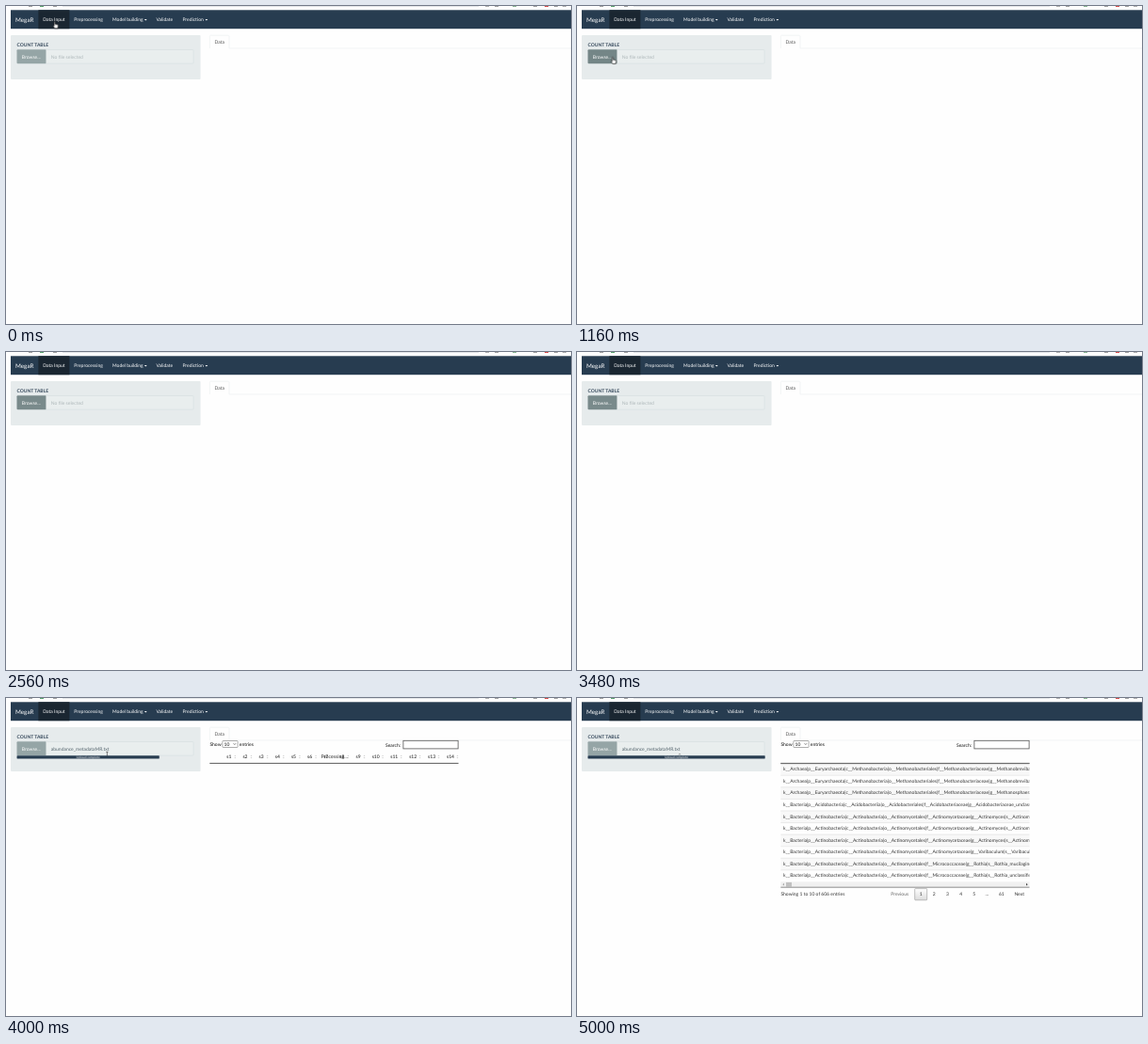
Write an HTML page that moves like this. It is 600 px wide and 338 px high and loops after 5.24 s.

```html
<!DOCTYPE html>
<html lang="en">
<head>
<meta charset="utf-8">
<title>Count table upload</title>
<style>
  html, body { margin: 0; width: 100%; height: 100%; overflow: hidden; background: #fefefe; }
  svg { display: block; width: 600px; height: 338px; }
  text { font: 5px Lato, sans-serif; fill: #333; text-rendering: geometricPrecision; white-space: pre; }
  .nav text { fill: #fff; }
  .brand { font-size: 6.33px; }
  .bold { font-weight: 700; }
  .mid { text-anchor: middle; }
  .light { fill: #fff; }
  .tiny { font-size: 3.33px; }
  .strong { fill: #222; font-weight: 500; }
  .mute { fill: #666; }
  .hidden { opacity: 0; }
  #bar { transform-origin: 11.5px 0; }
</style>
</head>
<body>
<svg viewBox="0 0 600 338">
  <defs>
    <linearGradient id="page" x2="0" y2="1">
      <stop stop-color="#fff"/><stop offset="1" stop-color="#dcdcdc"/>
    </linearGradient>
    <clipPath id="tableClip"><rect x="216.3" y="69" width="264.2" height="127"/></clipPath>
  </defs>

  <rect width="600" height="338" fill="#fefefe"/>
  <g id="toolbar">
    <rect x="60" width="442" height="1" fill="#e4e6e8"/>
  </g>

  <g class="nav">
    <rect x="5" y="4.3" width="595" height="19.9" fill="#273c50"/>
    <rect x="34.4" y="4.3" width="33" height="19.9" fill="#1a2631"/>
    <text class="brand" x="10" y="16.6">MegaR</text>
    <text x="39.3" y="16.1">Data Input</text>
    <text x="72.3" y="16.1">Preprocessing</text>
    <text x="113" y="16.1">Model building</text>
    <text x="159.6" y="16.1">Validate</text>
    <text x="187.4" y="16.1">Prediction</text>
    <path d="M146.9 13.9h2.8l-1.4 1.5zM211.5 13.9h2.8l-1.4 1.5z" fill="#fff"/>
  </g>

  <rect x="5" y="30.9" width="201.6" height="47" rx="1" fill="#e6ebec"/>
  <text class="bold" x="11.5" y="42.9" style="fill:#34475a">COUNT TABLE</text>
  <rect x="42.3" y="46.5" width="156.8" height="14.6" rx="1" fill="#e9eeee" stroke="#d6dedf" stroke-width=".6"/>
  <path id="button" d="M12.5 46.2h29.9v15H12.5q-1 0-1-1v-13q0-1 1-1z" fill="#95a5a6"/>
  <text class="light" x="16.8" y="55.5">Browse...</text>
  <text id="empty" x="47.8" y="55.5" style="fill:#adb7b9">No file selected</text>
  <text id="file" class="hidden" x="47.8" y="55.5" style="fill:#53636c">abundance_metadataMR.txt</text>

  <path d="M237 45h363M216.4 45V32.2q0-1 1-1H236q1 0 1 1V45" fill="none" stroke="#eef1f2" stroke-width=".7"/>
  <text x="221.6" y="40" style="fill:#555">Data</text>

  <g id="controls" class="hidden">
    <text class="strong" x="216.4" y="51">Show</text>
    <rect x="229.9" y="45.5" width="16.2" height="7" rx=".7" fill="#fff" stroke="#777" stroke-width=".6"/>
    <text class="strong" x="231.6" y="51">10</text>
    <path d="M241.6 48.3l1.2 1.2 1.2-1.2" fill="none" stroke="#222" stroke-width=".6"/>
    <text class="strong" x="247.8" y="51">entries</text>
    <text class="strong" x="403" y="51.5">Search:</text>
    <rect x="421.9" y="45.3" width="58.2" height="8.6" fill="#fff" stroke="#555" stroke-width=".8"/>
    <path d="M216.3 69.4h264.2" stroke="#333" stroke-width=".8"/>
  </g>
  <g id="heads" class="hidden"></g>
  <g id="table" class="hidden">
    <g id="rows" clip-path="url(#tableClip)"></g>
    <rect x="216.3" y="195.4" width="264.2" height="5.5" fill="#f1f1f1"/>
    <rect x="222" y="195.9" width="6" height="4.6" fill="#c1c1c1"/>
    <path d="M220 196.8v2.8l-1.7-1.4z" fill="#aaa"/>
    <path d="M477 196.8v2.8l1.7-1.4z" fill="#444"/>
    <path d="M216.3 201.2h264.2" stroke="#444" stroke-width=".6"/>
    <text x="216.4" y="210">Showing 1 to 10 of 606 entries</text>
    <rect x="358.7" y="202.6" width="13" height="12.2" rx=".7" fill="url(#page)" stroke="#979797" stroke-width=".6"/>
    <g id="pager"></g>
  </g>

  <g id="caret" class="hidden">
    <path d="M106.3 57.3h2.2M107.4 57.3v5M106.3 62.3h2.2" stroke="#333" stroke-width=".6"/>
  </g>
  <path id="caretTip" class="hidden" d="M108.2 60.3l.8-1 .8 1" fill="none" stroke="#444" stroke-width=".6"/>
  <g id="progress" class="hidden">
    <rect id="bar" x="11.5" y="61.3" width="188.2" height="3.2" rx=".4" fill="#273c50"/>
    <text id="done" class="light tiny mid" x="11.5" y="64.1">Upload complete</text>
  </g>

  <path id="arrow" class="hidden" d="M0 0v6.6l1.5-1.4 1 2.3 1-.4-1-2.3h2z" fill="#fff" stroke="#111" stroke-width=".5"/>
  <path id="hand" d="M1 .6Q1.6 0 2 .7V3l2.4.6q.9.3.8 1.2L4.7 7.6H1.6L-.2 5.1q0-.9 1.2-.2z" fill="#fff" stroke="#111" stroke-width=".6"/>
</svg>
<script>
const LOOP = 5240;
const $ = id => document.getElementById(id);

function add(parent, tag, attrs, content = '') {
  const el = document.createElementNS('http://www.w3.org/2000/svg', tag);
  for (const key in attrs) el.setAttribute(key, attrs[key]);
  el.textContent = content;
  return $(parent).appendChild(el);
}

// Slivers of the browser toolbar above the page
[[26, '#999'], [38, '#4a9a60'], [52, '#999'], [511, '#aaa'], [521, '#999'], [540, '#7fb08a'],
 [562, '#999'], [574, '#d33b3b'], [584, '#999'], [593, '#aaa']].forEach(([x, fill]) =>
  add('toolbar', 'rect', { x: x - 2, width: 4, height: .9, fill }));

// Column heads
for (let i = 1; i <= 14; i++) {
  const x = i < 11 ? 234.3 + (i - 1) * 17.15 : 408.3 + (i - 11) * 19.9;
  const icon = x + (i < 10 ? 8 : 10.4);
  add('heads', 'text', { x, y: 64.2, class: 'strong' }, 's' + i);
  add('heads', 'path', { d: `M${icon} 62l1-1.3 1 1.3zM${icon} 63l1 1.3 1-1.3z`, fill: '#ccc' });
}
add('heads', 'text', { x: 348.8, y: 64, class: 'mid', style: 'font-size:5.3px' }, 'Processing...');

// Taxonomy rows
const archaea = 'k__Archaea|p__Euryarchaeota|c__Methanobacteria|o__Methanobacteriales|f__Methanobacteriaceae|g__';
const acido = 'k__Bacteria|p__Acidobacteria|c__Acidobacteriia|o__Acidobacteriales|f__Acidobacteriaceae|g__';
const actino = 'k__Bacteria|p__Actinobacteria|c__Actinobacteria|o__Actinomycetales|f__';
const actinomyces = actino + 'Actinomycetaceae|g__Actinomyces|s__Actinomyces';
const rothia = actino + 'Micrococcaceae|g__Rothia|s__Rothia_';
[
  archaea + 'Methanobrevibacter', archaea + 'Methanobrevibacter', archaea + 'Methanosphaera|s__',
  acido + 'Acidobacteriaceae_unclassified',
  actinomyces, actinomyces, actinomyces,
  actino + 'Actinomycetaceae|g__Varibaculum|s__Varibaculum',
  rothia + 'mucilaginosa', rothia + 'unclassified'
].forEach((name, i) => {
  const y = 69.7 + i * 12.57;
  add('rows', 'rect', { x: 216, y, width: 265, height: 12.57, fill: i % 2 ? '#fefefe' : '#f8f8f8' });
  add('rows', 'path', { d: `M216 ${y}h265`, stroke: i ? '#ddd' : '#444', 'stroke-width': .6 });
  add('rows', 'text', { x: 219, y: y + 7.6 }, name);
});

[['Previous', 342.7], ['1', 365.2], ['2', 379.3], ['3', 393.5], ['4', 407.6], ['5', 421.7],
 ['…', 435.3], ['61', 450.8], ['Next', 469.7]].forEach(([label, x], i) =>
  add('pager', 'text', { x, y: 210.2, class: i ? 'mid' : 'mid mute' }, label));

// Steps are [ms, properties, easing to the next step]; the default is a hard change
function play(id, steps) {
  const frames = steps.map(([ms, props, easing = 'step-end']) => ({ offset: ms / LOOP, easing, ...props }));
  frames.push({ ...steps[steps.length - 1][1], offset: 1 });
  $(id).animate(frames, { duration: LOOP, iterations: Infinity });
}
const at = (x, y) => ({ transform: `translate(${x}px, ${y}px)` });
const show = (id, from, to = LOOP) => {
  const steps = [[0, { opacity: from ? 0 : 1 }]];
  if (from) steps.push([from, { opacity: 1 }]);
  if (to < LOOP) steps.push([to, { opacity: 0 }]);
  play(id, steps);
};

const path = [
  [0, at(50.2, 16.2)],
  [540, at(50.2, 16.2), 'ease-in-out'],
  [1080, at(36.4, 53.2)],
  [1120, at(36.4, 53.9)]
];
play('hand', path);
play('arrow', path);
play('hand', [[0, { opacity: 1 }], [720, { opacity: 0 }], [880, { opacity: 1 }], [1320, { opacity: 0 }]]);
show('arrow', 720, 880);

play('button', [
  [0, { fill: '#95a5a6' }],
  [880, { fill: '#748687' }],
  [1320, { fill: '#748687' }, 'linear'],
  [1560, { fill: '#798a8b' }],
  [3520, { fill: '#95a5a6' }]
]);

show('empty', 0, 3560);
show('file', 3560);
show('caret', 3520, 4040);
show('caretTip', 4040);
show('progress', 3680);
play('bar', [[0, { transform: 'scaleX(0)' }], [3700, { transform: 'scaleX(0)' }, 'ease'], [4300, { transform: 'scaleX(1)' }]]);
play('done', [[0, at(0, 0)], [3700, at(0, 0), 'ease'], [4300, at(94.1, 0)]]);

show('controls', 4000);
show('heads', 4000, 4720);
show('table', 4720);
</script>
</body>
</html>
```
